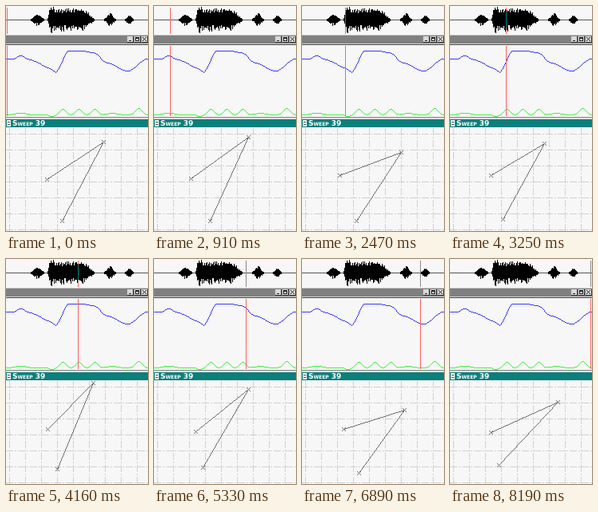
These frames come from a looping animation (178 by 282 pixels, 8320 ms). An HTML page with a canvas:

```html
<!DOCTYPE html>
<html lang="en">
<head>
<meta charset="utf-8">
<title>Sweep 39</title>
<style>
  html, body { margin: 0; width: 178px; height: 282px; overflow: hidden; background: #f7f7f7; }
  body { position: relative; }
  canvas { display: block; image-rendering: pixelated; }
  #title { position: absolute; left: 8px; top: 142px; font: small-caps bold 9px/11px "DejaVu Sans", sans-serif; color: #fff; white-space: pre; }
</style>
</head>
<body>
<canvas id="stage" width="178" height="282"></canvas>
<div id="title">Sweep 39</div>
<script>
const W = 178, H = 282, STEP = 130, STEPS = 64;
const ctx = document.getElementById('stage').getContext('2d');

const bump = (x, center, width) => Math.exp(-(((x - center) / width) ** 2));
const ease = (x, from, to) => {
  const t = Math.min(1, Math.max(0, (x - from) / (to - from)));
  return t * t * (3 - 2 * t);
};

const pitch = x => 66.5 - 5 * bump(x, 18, 6) + 13 * ease(x, 26, 62) + 2 * bump(x, 61, 3)
  - 26 * ease(x, 61, 79) + 2 * ease(x, 60, 62) + 3 * ease(x, 92, 112)
  + 12 * ease(x, 110, 126) + 11 * ease(x, 124, 154) - 16 * ease(x, 151, 178);

const energy = x => 136 - 2.5 * bump(x, 18, 9) + 2 * bump(x, 57, 4)
  - 7 * (bump(x, 71, 5) + bump(x, 91, 5) + bump(x, 111, 5))
  - 2 * bump(x, 133, 9) - 8 * bump(x, 166, 6);

const loudness = x => 7 * bump(x, 39, 6) + 14 * ease(x, 51, 55) * (1 - ease(x, 96, 113))
  + 4 * bump(x, 57, 3) + 9 * bump(x, 130, 5) + 6 * bump(x, 154, 4);

const cursorX = step => Math.floor(1 + step * 2.79);

// The apex follows the pitch trace; the other joints drift around their rest places
function joints(step) {
  const rise = pitch(cursorX(step)) - 55.5;
  const dip = bump(step, 19, 6), swing = bump(step, 53, 5);
  const sink = ease(step, 53, 63);
  const left = [
    52 - 9 * bump(step, 12.5, 8) - 1.5 * sink,
    217 - 5.5 * bump(step, 24, 13) - 4 * swing
  ];
  const apex = [
    109 + 0.77 * rise + 5 * (1 - ease(step, 0, 20)) - 2 * dip + 5 * bump(step, 41, 5) + 18 * sink,
    155 + 1.35 * rise - 2 * dip + 10 * sink
  ];
  const lower = [
    70 - 9 * ease(step, 10, 44) + 10 * swing,
    269 - 8 * ease(step, 18, 40) + 7 * swing - 3 * sink
  ];
  return [left, apex, lower].map(point => point.map(Math.round));
}

function rect(g, color, x, y, w, h) {
  g.fillStyle = color;
  g.fillRect(x, y, w, h);
}

function line(g, color, [x0, y0], [x1, y1]) {
  const n = Math.max(Math.abs(x1 - x0), Math.abs(y1 - y0), 1);
  for (let i = 0; i <= n; i++)
    rect(g, color, Math.round(x0 + (x1 - x0) * i / n), Math.round(y0 + (y1 - y0) * i / n), 1, 1);
}

function trace(g, curve, color) {
  let last = Math.round(curve(0));
  for (let x = 0; x < W; x++) {
    const y = Math.round(curve(x));
    line(g, color, [x, last + Math.sign(y - last)], [x, y]);
    last = y;
  }
}

function cross(g, color, [x, y], r) {
  line(g, color, [x - r, y - r], [x + r, y + r]);
  line(g, color, [x - r, y + r], [x + r, y - r]);
}

function drawWave(g) {
  let seed = 39;
  const random = () => (seed = seed * 16807 % 2147483647) / 2147483647;
  rect(g, '#555', 0, 17, W, 1);
  for (let x = 0; x < W; x++) {
    const size = loudness(x);
    const up = Math.round(size * (0.6 + 0.4 * random()));
    const down = Math.round(size * (0.4 + 0.6 * random()));
    if (size > 0.8) rect(g, '#000', x, 17 - up, 1, up + down + 1);
  }
}

function drawButtons(g) {
  for (const x of [152, 161, 170]) {
    rect(g, '#333', x, 38, 8, 8);
    rect(g, '#d8d8d8', x, 38, 7, 7);
  }
  rect(g, '#222', 154, 43, 3, 1);
  rect(g, '#222', 162, 39, 5, 5);
  rect(g, '#d8d8d8', 163, 41, 3, 2);
  cross(g, '#222', [173, 41], 2);
}

function drawGrid(g) {
  g.strokeStyle = '#d0d0d0';
  g.setLineDash([9, 2, 2, 2]);
  g.beginPath();
  for (let x = 4.5; x < W; x += 20) {
    g.moveTo(x, 153);
    g.lineTo(x, H);
  }
  for (let y = 160.5; y < H; y += 20) {
    g.moveTo(0, y);
    g.lineTo(W, y);
  }
  g.stroke();
}

function makeBackdrop() {
  const canvas = document.createElement('canvas');
  canvas.width = W;
  canvas.height = H;
  const g = canvas.getContext('2d');
  rect(g, '#f7f7f7', 0, 0, W, H);
  drawWave(g);
  rect(g, '#c8c8c8', 0, 36, W, 1);
  rect(g, '#808080', 0, 37, W, 10);
  rect(g, '#d8d8d8', 0, 47, W, 1);
  rect(g, '#444', 0, 48, W, 1);
  drawButtons(g);
  trace(g, energy, '#40f040');
  trace(g, pitch, '#3838ff');
  rect(g, '#888', 0, 139, W, 1);
  rect(g, '#e0e0e0', 0, 140, W, 2);
  rect(g, '#0b7f7b', 0, 142, W, 10);
  rect(g, '#f4f4f4', 1, 143, 5, 8);
  rect(g, '#555', 2, 145, 3, 1);
  rect(g, '#555', 2, 148, 3, 1);
  drawGrid(g);
  return canvas;
}

const backdrop = makeBackdrop();

function drawCursor(step, x) {
  rect(ctx, step < 33 ? '#ff6060' : '#888', x, 2, 1, 33);
  const size = Math.round(loudness(x) * 0.7);
  if (step > 18 && size > 2) rect(ctx, '#088', x, 17 - size, 1, size * 2);
  rect(ctx, '#ff6060', x, 50, 1, 88);
}

function draw(step) {
  ctx.drawImage(backdrop, 0, 0);
  drawCursor(step, cursorX(step));
  const [left, apex, lower] = joints(step);
  line(ctx, '#707070', left, apex);
  line(ctx, '#707070', apex, lower);
  for (const joint of [left, apex, lower]) cross(ctx, '#707070', joint, 2);
}

let shown = -1;
function tick() {
  let step = Math.floor(performance.now() / STEP) % STEPS;
  if (step === 59) step = 58; // the sweep pauses for one beat
  if (step !== shown) draw(shown = step);
  requestAnimationFrame(tick);
}
tick();
</script>
</body>
</html>
```
